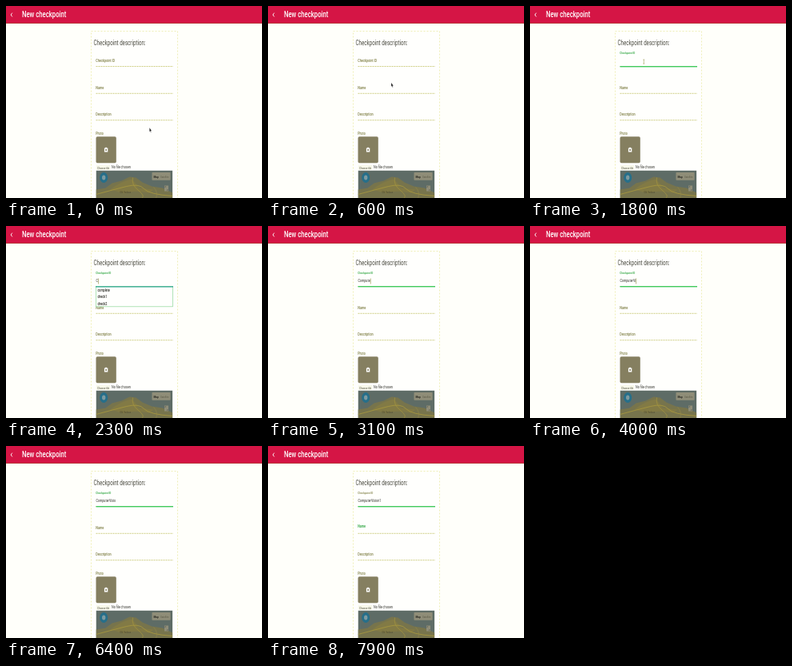
Animation, 320 px wide and 240 px high, one loop 8000 ms. Source, as an HTML page:

```html
<!DOCTYPE html>
<html lang="en">
<head>
<meta charset="utf-8">
<title>New checkpoint</title>
<style>
  html, body { margin: 0; width: 100%; height: 100%; overflow: hidden; background: #fffffa; }
  svg { display: block; width: 100vw; height: 100vh; }
  text { font-family: Roboto, sans-serif; white-space: pre; }
</style>
</head>
<body>
<svg id="stage" viewBox="0 0 320 240"></svg>
<script>
const LOOP = 8000, STEP = 100;
const SQUEEZE = 0.75;
const GREEN = '#22a035', OLIVE = '#7c7c40', INK = '#30302a', CARET = '#9c9c55';
const LEFT = 112.2;
const FOCUS_ID = 1000, FOCUS_NAME = 7860, FLOAT = 250;
const WORD = 'ComputerVision1';
const KEYS = [2200, 2400, 2500, 2700, 2800, 2900, 3050, 3300, 3700, 3900, 4100, 4300, 5800, 6600, 7100];
const OPTIONS = ['complete', 'check1', 'check2'];
const stage = document.getElementById('stage');

function set(node, attrs) {
  for (const k in attrs) node.setAttribute(k, attrs[k]);
  return node;
}
function add(tag, attrs, parent = stage) {
  return parent.appendChild(set(document.createElementNS('http://www.w3.org/2000/svg', tag), attrs));
}
function rect(x, y, width, height, fill, more, parent) {
  return add('rect', { x, y, width, height, fill, ...more }, parent);
}
function path(d, fill, more, parent) {
  return add('path', { d, fill, ...more }, parent);
}
function place(node, x, y) {
  return set(node, { transform: `translate(${x} ${y}) scale(${SQUEEZE} 1)` });
}
function text(str, x, y, size, fill, weight = 400, parent = stage) {
  const node = add('text', { 'font-size': size, 'font-weight': weight, fill }, parent);
  node.textContent = str;
  return place(node, x, y);
}
const show = (node, on) => set(node, { visibility: on ? 'visible' : 'hidden' });
const clamp = v => Math.max(0, Math.min(1, v));
const smooth = v => v * v * (3 - 2 * v);

// Card
rect(106.5, 31.5, 108, 220, '#fffffd', { stroke: '#efefb8', 'stroke-dasharray': '2 2' });
text('Checkpoint description:', 109.6, 49, 8.25, '#4a4a40');

// Toolbar
rect(0, 0, 320, 22, '#d51545');
rect(0, 21, 320, 1, '#b83a3c');
path('M7.8 8.6L6.1 11L7.8 13.4', 'none', { stroke: '#fff', 'stroke-width': 0.9 });
text('New checkpoint', 20, 14.2, 10.3, '#fff', 500);

// Fields
function field(name, y) {
  path(`M112.5 ${y}H209`, 'none', { stroke: '#caca78', 'stroke-width': 0.9, 'stroke-dasharray': '2 1' });
  const label = text(name, LEFT, y - 5.5, 5.1, OLIVE, 500);
  const line = rect(112.5, y - 0.5, 96.5, 1.4, '#41c95c');
  return { label, line, y };
}
const idField = field('Checkpoint ID', 75.5);
const nameField = field('Name', 109.3);
const infoField = field('Description', 142.7);
show(infoField.line, false);

function styleField(f, start, t, active, lit) {
  const p = clamp((t - start) / FLOAT);
  set(f.label, { fill: active ? GREEN : OLIVE, 'font-size': 5.1 - p });
  place(f.label, LEFT, f.y - 5.5 - 9.7 * p);
  show(f.line, lit);
}

const value = text('', 112.4, 70.3, 5, INK);
const caret = rect(0, 65.5, 0.7, 7, CARET);

// Photo picker
text('Photo', LEFT, 161.2, 4.8, OLIVE, 500);
rect(112.5, 163.2, 25.3, 33, '#857f60', { rx: 1.8 });
path('M122.9 177.6H124L124.4 176.7H125.8L126.2 177.6H127.3V182.4H122.9Z', '#fff');
add('ellipse', { cx: 125.1, cy: 179.9, rx: 0.9, ry: 1.2, fill: '#857f60' });
rect(112.7, 199, 18, 5.8, '#f8f8ea', { rx: 0.8 });
text('Choose file', 114, 203.6, 4.1, '#4a4a38');
text('No file chosen', 132, 203.4, 5, INK);

// Map
const map = add('svg', { x: 112.5, y: 205.5, width: 95.7, height: 34.5, viewBox: '0 0 95.7 34.5' });
rect(0, 0, 96, 35, '#5e6c66', {}, map);
path('M0 35V24L12 22L20 16L32 13L42 8L50 9L58 15L70 20L83 22L96 28V35Z', '#77744c', {}, map);
path('M18 24Q30 14 44 11Q50 15 53 22Q60 23 72 24L66 28Q45 24 36 29Z', '#827a45', {}, map);
path('M0 30Q22 24 38 20T60 23T96 32', 'none', { stroke: '#a5963f', 'stroke-width': 0.9 }, map);
path('M46 9Q44 18 53 25T57 35', 'none', { stroke: '#a5963f', 'stroke-width': 0.7 }, map);
path('M72 21Q78 27 75 35', 'none', { stroke: '#94894a', 'stroke-width': 0.6 }, map);
text('Old Harbour', 30, 28.5, 3.4, '#4b4a36', 400, map);
add('ellipse', { cx: 9.7, cy: 9, rx: 5, ry: 6.5, fill: '#266f8a' }, map);
add('ellipse', { cx: 9.7, cy: 9, rx: 2.2, ry: 2.9, fill: '#7d9aa0' }, map);
rect(70, 2.6, 23, 9.6, '#8f8d78', { rx: 0.8 }, map);
text('Map', 72, 9, 4.3, '#2b2b26', 700, map);
text('Satellite', 80.5, 9, 3.9, '#5b5a48', 400, map);
rect(85.5, 19, 5, 7, '#8f8d78', {}, map);
path('M86.5 21.5V20.2H87.5M89.5 23.5V24.8H88.5', 'none', { stroke: '#56564a', 'stroke-width': 0.6 }, map);

// Suggestions
const menu = add('g', {});
const menuBox = rect(112.4, 75.6, 96.2, 25.2, '#fffffd', { stroke: '#8fd79a', 'stroke-width': 0.7 }, menu);
rect(112, 75.2, 97, 1.4, '#3fae98', {}, menu);
const items = OPTIONS.map((s, i) => text(s, 114.4, 82.3 + 8.1 * i, 4.9, '#22221c', 500, menu));

// Pointers
const arrow = path('M0 0V5.2L0.9 4.3L1.6 6L2.3 5.6L1.6 4H2.8Z', '#111', { stroke: '#fff', 'stroke-width': 0.3 });
const beam = path('M-0.9 -2.6H0.9M0 -2.6V2.6M-0.9 2.6H0.9', 'none', { stroke: CARET, 'stroke-width': 0.6 });

function drawMenu(typed) {
  const hits = typed ? OPTIONS.filter(s => s.startsWith(typed.toLowerCase())) : [];
  show(menu, hits.length > 0);
  set(menuBox, { height: 0.9 + 8.1 * hits.length });
  items.forEach((node, i) => {
    node.textContent = hits[i] || '';
  });
}

function draw(t) {
  const onName = t >= FOCUS_NAME;
  const onId = t >= FOCUS_ID && !onName;
  styleField(idField, FOCUS_ID, t, onId, t >= FOCUS_ID);
  styleField(nameField, FOCUS_NAME, t, onName, false);

  const count = KEYS.filter(k => k <= t).length;
  const typed = WORD.slice(0, count);
  value.textContent = typed;
  drawMenu(typed);

  const last = count ? KEYS[count - 1] : FOCUS_ID;
  const width = count ? value.getComputedTextLength() * SQUEEZE : 0;
  set(caret, { x: 112.6 + width });
  show(caret, onId && (t - last) % 1060 < 530);

  const p = smooth(clamp((t - 100) / 800));
  const x = 179.3 + (142.3 - 179.3) * p, y = 152 + (69.6 - 152) * p;
  const over = [idField, nameField, infoField].some(f => y > f.y - 12 && y < f.y);
  const free = t < KEYS[0];
  set(arrow, { transform: `translate(${x} ${y})` });
  set(beam, { transform: `translate(${x} ${y})` });
  show(arrow, free && !over);
  show(beam, free && over);
}

const start = performance.now();
function tick() {
  const t = (performance.now() - start) % LOOP;
  draw(Math.floor(t / STEP) * STEP);
  requestAnimationFrame(tick);
}
tick();
</script>
</body>
</html>
```
